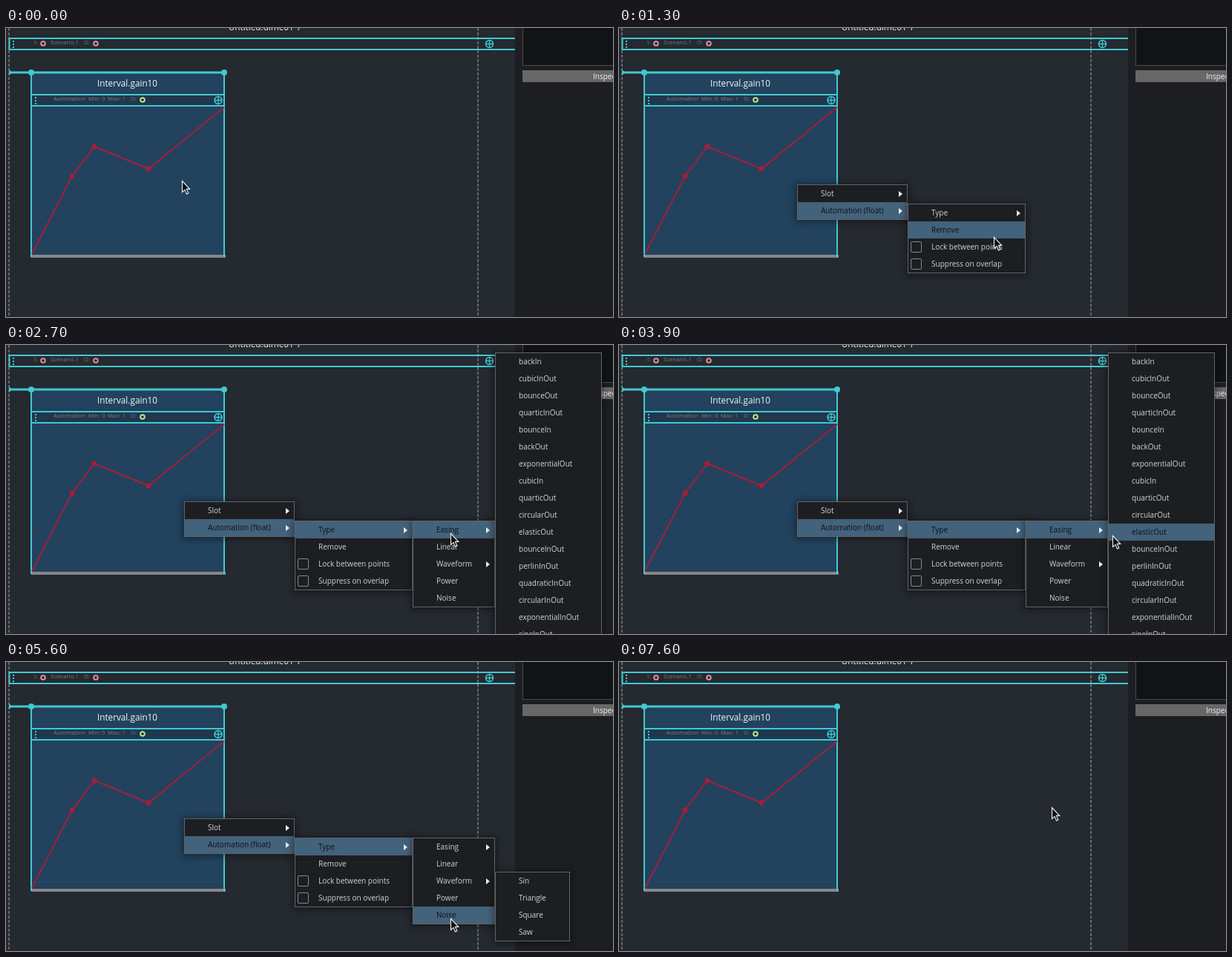
Write an HTML page that moves like this. It is 818 px wide and 390 px high and loops after 7.7 s.

```html
<!DOCTYPE html>
<html lang="en">
<head>
<meta charset="utf-8">
<title>Automation menu</title>
<style>
  html, body { margin: 0; width: 100%; height: 100%; overflow: hidden; background: #252930; }
  body { font-family: "Open Sans", "Noto Sans", sans-serif; }
  #stage { position: absolute; left: 0; top: 0; width: 818px; height: 390px; overflow: hidden; }
  #stage > svg { position: absolute; left: 0; top: 0; }
  .accent { stroke: #42c9d1; stroke-width: 2; fill: none; }
  .dot { fill: #42c9d1; }
  .dash { stroke: #85888b; stroke-width: 1.3; stroke-dasharray: 4 2; }
  .title { font-size: 11.75px; fill: #f5f7f8; text-anchor: middle; }
  .small { font-size: 7.8px; fill: #777d82; }
  .port { fill: #1c1d21; stroke-width: 2; }
  .menu {
    position: absolute; box-sizing: border-box; visibility: hidden;
    background: #1d1e22; border: 1px solid #626466;
    box-shadow: 0 1px 9px 2px rgba(0, 0, 0, .4);
    font-size: 10px; font-weight: 500; line-height: 23px; color: #d3d4d5;
  }
  .row { position: relative; height: 23px; padding-left: 31px; white-space: nowrap; }
  .row.on { background: #43627b; color: #0c1116; }
  .more::after {
    content: ""; position: absolute; right: 6px; top: 7.5px;
    border: solid transparent; border-width: 4px 0 4px 5px; border-left-color: #eceeef;
  }
  .check::before {
    content: ""; position: absolute; left: 3px; top: 4px; width: 13px; height: 13px;
    border: 1px solid #85878a; border-radius: 2px;
  }
</style>
</head>
<body>
<div id="stage">
  <svg width="818" height="390">
    <defs>
      <g id="target">
        <circle class="accent" r="5" style="stroke-width:1.5"/>
        <path class="accent" d="M-5 0H5M0-5V5" style="stroke-width:1.3"/>
      </g>
      <path id="grip" class="dot" d="M-1-5h2v2h-2zM-1-1h2v2h-2zM-1 3h2v2h-2z"/>
    </defs>

    <!-- outer scenario -->
    <path class="dash" d="M4 0V390M636 0V390"/>
    <text class="title" x="349" y="3">Untitled.dime01-7</text>
    <rect class="accent" x="4.5" y="14" width="700" height="15"/>
    <use href="#grip" x="10" y="22"/>
    <use href="#target" x="651.5" y="21.5"/>
    <g class="small">
      <text x="38" y="22">I:</text>
      <text x="60" y="22">Scenario.1</text>
      <text x="105" y="22">O:</text>
    </g>
    <circle class="port" cx="50" cy="21" r="2.8" stroke="#e58c96"/>
    <circle class="port" cx="121" cy="21" r="2.8" stroke="#e58c96"/>

    <!-- interval box -->
    <rect x="34" y="60" width="260" height="248" fill="#22425e"/>
    <rect x="35" y="91" width="258" height="14" fill="#20374c"/>
    <rect x="34" y="306" width="262" height="4" fill="#878789"/>
    <path class="accent" d="M34 60V309M294 60V309M34 90H294M34 105H294"/>
    <path class="accent" d="M4 60H294" style="stroke-width:3"/>
    <path class="dot" d="M4 56L8 60L4 64Z"/>
    <circle class="dot" cx="34" cy="60" r="4"/>
    <circle class="dot" cx="294" cy="60" r="4"/>
    <text class="title" x="163.5" y="79">Interval.gain10</text>
    <use href="#grip" x="40" y="98"/>
    <use href="#target" x="286" y="97.5"/>
    <g class="small">
      <text x="64" y="98">Automation</text>
      <text x="111" y="98">Min: 0</text>
      <text x="137" y="98">Max: 1</text>
      <text x="168" y="98">O:</text>
    </g>
    <circle class="port" cx="184" cy="97" r="2.8" stroke="#b4ea96"/>
    <path d="M35 305L89 200L119 160L192 190L294 107" fill="none" stroke="#a31f3b" stroke-width="2"/>
    <g fill="#a81d38">
      <circle cx="89" cy="200" r="3.5"/>
      <circle cx="119" cy="160" r="3.5"/>
      <circle cx="192" cy="190" r="3.5"/>
    </g>

    <!-- side panel -->
    <rect x="686" width="132" height="390" fill="#1d1e22"/>
    <rect x="696.5" y="-5" width="130" height="55.5" fill="#111416" stroke="#484a4c"/>
    <rect x="696" y="57" width="122" height="16" fill="#676768"/>
    <text x="791" y="68.5" font-size="10" font-weight="500" fill="#f4f4f4">Inspector</text>
  </svg>
</div>

<script>
  const LOOP = 7700, STEP = 100, ROW = 23;
  const stage = document.getElementById("stage");

  // Labels ending in ">" open a submenu, labels starting with "?" have a check box.
  const easings = "backIn cubicInOut bounceOut quarticInOut bounceIn backOut exponentialOut " +
    "cubicIn quarticOut circularOut elasticOut bounceInOut perlinInOut quadraticInOut " +
    "circularInOut exponentialInOut sineInOut";
  const menus = [
    { x: 240, y: 211, w: 149, from: 100, to: 6600, labels: ["Slot>", "Automation (float)>"] },
    { x: 389, y: 237, w: 159, from: 600, to: 6600, parent: 0, parentRow: 1,
      labels: ["Type>", "Remove", "?Lock between points", "?Suppress on overlap"] },
    { x: 548, y: 237, w: 111, from: 1800, to: 6600, parent: 1, parentRow: 0,
      labels: ["Easing>", "Linear", "Waveform>", "Power", "Noise"] },
    { x: 659, y: 10, w: 144, from: 2600, to: 4700, parent: 2, parentRow: 0,
      labels: easings.split(" ") },
    { x: 659, y: 283, w: 101, from: 4800, to: 5800, parent: 2, parentRow: 2,
      labels: ["Sin", "Triangle", "Square", "Saw"] }
  ];

  // Pointer path: time, x, y
  const path = [
    [0, 237, 206], [100, 237, 206], [300, 262, 228], [600, 330, 247], [800, 372, 248],
    [1000, 376, 248], [1200, 460, 270], [1300, 505, 282], [1500, 515, 262], [1700, 505, 250],
    [1900, 530, 250], [2300, 585, 252], [2500, 599, 254], [2900, 599, 254], [3200, 640, 252],
    [3800, 640, 252], [4000, 690, 262], [4300, 700, 335], [4450, 670, 300], [4600, 596, 298],
    [4700, 596, 298], [5000, 690, 298], [5200, 700, 322], [5400, 640, 318], [5500, 605, 325],
    [5600, 599, 346], [5800, 600, 320], [6000, 599, 270], [6200, 598, 217], [6400, 583, 196],
    [LOOP, 583, 196]
  ];

  for (const m of menus) {
    m.el = document.createElement("div");
    m.el.className = "menu";
    m.el.style.cssText = `left:${m.x}px;top:${m.y}px;width:${m.w}px`;
    m.rows = m.labels.map(label => {
      const row = document.createElement("div");
      row.className = "row";
      row.classList.toggle("more", label.endsWith(">"));
      row.classList.toggle("check", label.startsWith("?"));
      row.textContent = label.replace(/[?>]/g, "");
      m.el.append(row);
      return row;
    });
    stage.append(m.el);
  }

  stage.insertAdjacentHTML("beforeend", `<svg id="pointer" width="16" height="24" style="overflow:visible">
    <path d="M.5.5V15.5L4 12.3L6.5 18L8.8 17L6.4 11.4H10.7Z" fill="#08090a" stroke="#f4f4f4" stroke-width="1.1"/></svg>`);
  const pointer = document.getElementById("pointer");

  function pointerAt(t) {
    const i = path.findIndex(p => p[0] > t);
    const [a, b] = [path[i - 1], path[i]];
    const k = (t - a[0]) / (b[0] - a[0]);
    return [a[1] + (b[1] - a[1]) * k, a[2] + (b[2] - a[2]) * k];
  }

  const rowUnder = (m, x, y) =>
    x >= m.x && x < m.x + m.w ? Math.floor((y - m.y - 1) / ROW) : -1;

  function draw(t) {
    const [x, y] = pointerAt(t);
    pointer.style.transform = `translate(${Math.round(x)}px, ${Math.round(y)}px)`;
    const isOpen = m => t >= m.from && t < m.to;
    menus.forEach((m, id) => {
      m.el.style.visibility = isOpen(m) ? "visible" : "hidden";
      let active = rowUnder(m, x, y);
      if (!m.rows[active]) {
        const child = menus.find(c => c.parent === id && isOpen(c));
        active = child ? child.parentRow : -1;
      }
      m.rows.forEach((row, i) => row.classList.toggle("on", i === active));
    });
  }

  const start = performance.now();
  function tick() {
    const t = (performance.now() - start) % LOOP;
    draw(Math.floor(t / STEP) * STEP);
    requestAnimationFrame(tick);
  }
  tick();
</script>
</body>
</html>
```
